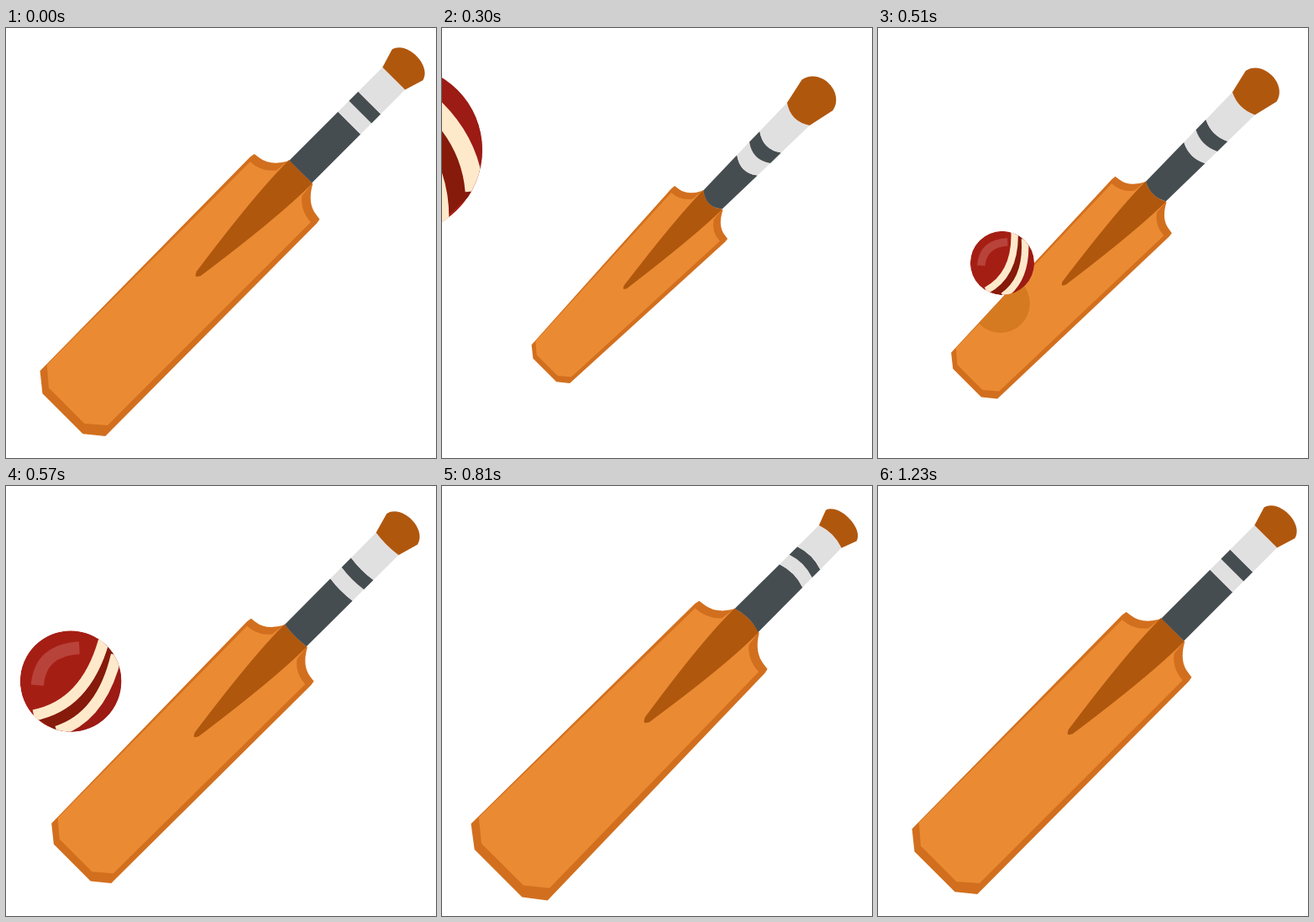
Recreate the animation shown at these times as an HTML page with a canvas. Size 512 px wide and 512 px high, loop 1260 ms.

```html
<!DOCTYPE html>
<html lang="en">
<head>
<meta charset="utf-8">
<title>Cricket bat and ball</title>
<style>
html, body { margin: 0; height: 100%; overflow: hidden; background: #fff; }
canvas { display: block; width: 512px; height: 512px; }
</style>
</head>
<body>
<canvas id="stage" width="512" height="512"></canvas>
<script>
const ctx = document.getElementById('stage').getContext('2d');
const LOOP = 1260, STEP = 30, HIT = 540;
const BROWN = '#b0570e', GRIP = '#464d50', WHITE = '#e1e0e0';

// Half profiles of the bat: [distance from knob, half width, is control point]
const NECK = [157, 19.5];
const back = [NECK, [178, 31, 1], [180, 48], [181, 55], [187, 56], [544, 55], [561, 34]];
const face = [NECK, [176, 21.5], [190, 32, 1], [191, 51], [533, 51], [551, 30]];
const wedge = [NECK, [212, 20, 1], [329, 3.5], [333, 1]];
const bands = [[157, 75, GRIP], [75, 56.5, WHITE], [56.5, 41, GRIP], [41, 0, WHITE]];

// Seen positions of knob, grip end, neck, wedge tip and toe, with the narrowing towards the toe.
const rest = { origin: -284, axis: 7, taper: 0, joints: [0, 75, 157, 331, 561] };
const swungBack = { origin: -227.5, axis: 10.5, taper: .0013, joints: [0, 86, 144, 293, 429] };
const swungForward = { origin: -284.5, axis: 8, taper: -.00047, joints: [0, 57, 125, 290, 565] };

const lerp = (a, b, k) => a + (b - a) * k;
const smooth = u => u * u * (3 - 2 * u);

function swingAt(t) {
  if (t < 300) return 1 - (1 - t / 300) ** 2.2;
  if (t < 690) return 1 - 2 * smooth(((t - 300) / 390) ** 2.29);
  return smooth(Math.min(1, (t - 690) / 240)) - 1;
}

function place(pose, s, h) {
  const from = rest.joints, to = pose.joints;
  const i = Math.max(1, from.findIndex(j => j >= s));
  const along = lerp(to[i - 1], to[i], (s - from[i - 1]) / (from[i] - from[i - 1]));
  return [pose.origin + along, pose.axis + h / (1 + pose.taper * s)];
}

function project(swing, s, h) {
  const [x0, y0] = place(rest, s, h);
  const [x1, y1] = place(swing < 0 ? swungForward : swungBack, s, h);
  const k = Math.abs(swing);
  return [lerp(x0, x1, k), lerp(y0, y1, k)];
}

// Curve across the handle; it bulges with the tilt of the bat.
function across(path, swing, [x0, y0], [x1, y1]) {
  path.quadraticCurveTo((x0 + x1) / 2 + 13 * swing, (y0 + y1) / 2, x1, y1);
}

function mirrored(half, swing, lean = 0) {
  const at = side => ([s, h, control]) => [project(swing, s, side * h + lean * s), control];
  const points = [...half.map(at(-1)), ...half.map(at(1)).reverse()];
  const path = new Path2D();
  path.moveTo(...points[0][0]);
  for (let i = 1; i < points.length; i++) {
    const [p, control] = points[i];
    if (control) path.quadraticCurveTo(...p, ...points[++i][0]);
    else path.lineTo(...p);
  }
  across(path, swing, points.at(-1)[0], points[0][0]);
  return path;
}

function fill(path, color) {
  ctx.fillStyle = color;
  ctx.fill(path);
}

function disc(x, y, r) {
  const path = new Path2D();
  path.arc(x, y, r, 0, 7);
  return path;
}

function ballAt(t) {
  if (t < 270 || t >= 600) return null;
  const depth = t < HIT ? .0099 + (t - 300) * .000078 : .0286 - (t - HIT) * .0004;
  const r = 1 / depth;
  return { r, x: 148 - 3.19 * (r - 38), y: 280 - 2.14 * (r - 38),
           gap: Math.abs(t - HIT) * (t < HIT ? 1.6 : 14), turn: (t - 510) * .005 };
}

function drawShadow(facePath, { x, y, r, gap }) {
  ctx.save();
  ctx.clip(facePath);
  ctx.resetTransform();
  fill(disc(x - 2, y + gap, r * .92), '#d57a20');
  ctx.restore();
}

function drawBat(swing, ball) {
  ctx.save();
  // x runs from knob to toe, y across the bat
  const d = Math.SQRT1_2;
  ctx.setTransform(-d, d, d, d, 256, 256);

  const facePath = mirrored(face, swing);
  fill(mirrored(back, swing, .006), '#d26f1e');
  fill(facePath, '#ea8b33');
  if (ball) drawShadow(facePath, ball);
  fill(mirrored(wedge, swing), BROWN);

  for (const [low, high, color] of bands) {
    const [a, b, c, e] = [[low, -19], [low, 19], [high, 19], [high, -19]].map(p => project(swing, ...p));
    const band = new Path2D();
    band.moveTo(...a);
    across(band, swing, a, b);
    band.lineTo(...c);
    across(band, swing, c, e);
    fill(band, color);
  }

  const left = project(swing, 0, -19), right = project(swing, 0, 19);
  const mid = (left[1] + right[1]) / 2;
  const rim = left[0] - 23 - 9 * swing, dome = rim - 20 - 6 * swing;
  const knob = new Path2D();
  knob.moveTo(...left);
  knob.lineTo(rim, mid - 26);
  knob.bezierCurveTo(dome, mid - 21, dome, mid + 21, rim, mid + 26);
  knob.lineTo(...right);
  across(knob, swing, right, left);
  fill(knob, BROWN);
  ctx.restore();
}

function drawBall({ x, y, r, turn }) {
  const seam = 'M.39 -.95Q.42 .37 -.5 .86', seamBack = 'M.71 -.76Q.8 .5 .03 1.03';
  ctx.save();
  ctx.translate(x, y);
  ctx.scale(r, r);
  const body = disc(0, 0, 1);
  ctx.clip(body);
  fill(body, '#a51e14');

  ctx.save();
  ctx.rotate(turn);
  fill(new Path2D(seam + 'L.03 1.03Q.8 .5 .71 -.76Z'), '#861a0b');
  fill(new Path2D(seamBack + 'L1.2 1.2L1.2 -.8Z'), '#9c1b14');
  ctx.strokeStyle = '#ffe9cb';
  ctx.lineWidth = .22;
  ctx.stroke(new Path2D(seam + seamBack));
  ctx.restore();

  ctx.strokeStyle = '#b8433b';
  ctx.lineWidth = .25;
  ctx.stroke(new Path2D('M-.66 .08Q-.6 -.62 .17 -.66'));
  ctx.restore();
}

function render(now) {
  const t = Math.floor(now % LOOP / STEP) * STEP;
  const ball = ballAt(t);
  ctx.clearRect(0, 0, 512, 512);
  drawBat(swingAt(t), ball);
  if (ball) drawBall(ball);
}

let start;
function tick(now) {
  start ??= now;
  render(now - start);
  requestAnimationFrame(tick);
}
requestAnimationFrame(tick);
</script>
</body>
</html>
```
